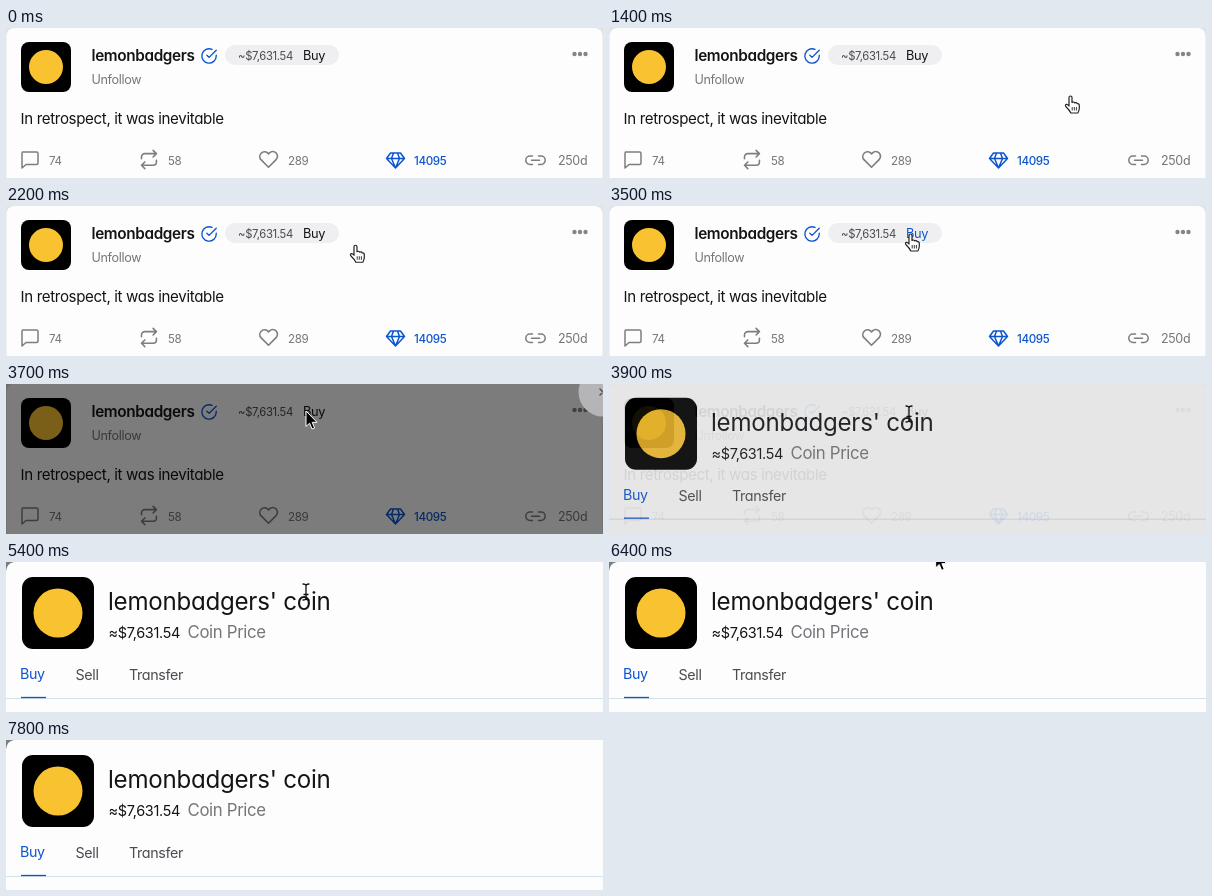
Animation, 597 px wide and 150 px high, one loop 8000 ms. Source, as an HTML page:

```html
<!DOCTYPE html>
<html lang="en">
<head>
<meta charset="utf-8">
<title>Coin purchase</title>
<style>
  html, body { margin: 0; width: 100%; height: 100%; overflow: hidden; background: #fdfdfe; }
  svg { display: block; font: 11.6px Inter, sans-serif; letter-spacing: -.03em; font-feature-settings: "cv11"; }
  .line { fill: none; stroke: #7d7d82; stroke-width: 1.5; stroke-linecap: round; stroke-linejoin: round; }
  .blue { stroke: #0d55cf; }
  .feather { stroke-width: 1.9; }
  .grey { fill: #75757a; }
  .tab { font-size: 14.3px; fill: #4b4b50; }
  .cursor { stroke-linejoin: round; }
</style>
</head>
<body>
<svg width="597" height="150" viewBox="0 0 597 150" fill="#141416">
  <g id="post">
    <rect width="597" height="150" fill="#e3e3e5"/>
    <rect x=".5" width="596" height="170" rx="8" fill="#fdfdfe"/>
    <rect x="15" y="14" width="50" height="50" rx="8" fill="#000"/>
    <circle cx="40" cy="39" r="17" fill="#f9c231"/>
    <text x="85.5" y="32.5" font-size="15.3" font-weight="600">lemonbadgers</text>
    <path class="line blue feather" transform="translate(194.4 19.3) scale(.72)"
      d="M22 11.1V12a10 10 0 1 1-5.9-9.1M22 4 12 14l-3-3"/>
    <rect id="pill" x="219" y="17" width="114" height="20" rx="10" fill="#efeff1"/>
    <text x="232" y="32" font-size="11.3" fill="#4b4b50">~$7,631.54</text>
    <text id="buy" x="297" y="32" font-size="12.8">Buy</text>
    <g fill="#858589">
      <circle cx="568.5" cy="26" r="2.2"/><circle cx="574" cy="26" r="2.2"/><circle cx="579.5" cy="26" r="2.2"/>
    </g>
    <text class="grey" x="85.5" y="56" font-size="12.6">Unfollow</text>
    <text x="14.5" y="96" font-size="15.1">In retrospect, it was inevitable</text>

    <g class="line">
      <path d="M16.5 124h14q1.5 0 1.5 1.5v9.5q0 1.5-1.5 1.5H20l-4 3.5v-14.5q0-1.5 1-1.5z"/>
      <path class="feather" transform="translate(133 121.5) scale(.83)"
        d="M17 1l4 4-4 4M3 11V9a4 4 0 0 1 4-4h14M7 23l-4-4 4-4M21 13v2a4 4 0 0 1-4 4H3"/>
      <path class="feather" transform="translate(252.2 121) scale(.86)"
        d="M20.8 4.6a5.5 5.5 0 0 0-7.7 0L12 5.7l-1.1-1.1a5.5 5.5 0 0 0-7.7 7.8L12 21.2l8.8-8.8a5.5 5.5 0 0 0 0-7.8z"/>
      <path class="blue" d="M384.500 125h10l4 5.500-9 9.500-9-9.500zM380.500 130.500h18M387.500 125l-2 5.500 4 9.500 4-9.500-2-5.500"/>
      <path d="M526.5 128h-2.5a4.2 4.2 0 0 0 0 8.4h2.5M532.5 128h2.5a4.2 4.2 0 0 1 0 8.4h-2.5M525.5 132.2h8"/>
    </g>
    <g class="grey">
      <text x="43" y="137">74</text>
      <text x="162" y="137">58</text>
      <text x="282" y="137">289</text>
      <text x="552" y="137" font-size="12.5">250d</text>
    </g>
    <text x="408" y="137" fill="#0d55cf" font-weight="500">14095</text>
  </g>

  <rect id="shade" width="597" height="150" fill="#000"/>
  <g id="close">
    <circle cx="597" cy="8" r="24.5" fill="#b5b4b6"/>
    <path class="line" style="stroke:#555" d="M594 5l6 6m0-6l-6 6"/>
  </g>

  <g id="modal">
    <rect y="-6" width="610" height="170" fill="#fdfdfe"/>
    <path id="corner" d="M0 0H8Q1 1 0 9z" fill="#7d7c7e"/>
    <rect x="16" y="15" width="72" height="72" rx="11" fill="#000"/>
    <circle cx="52" cy="51" r="24.5" fill="#f9c231"/>
    <text x="102" y="48" font-size="24.1" letter-spacing="-.01em">lemonbadgers' coin</text>
    <text x="102.5" y="76" font-size="14.5">≈$7,631.54</text>
    <text class="grey" x="181.5" y="76" font-size="16.8">Coin Price</text>
    <text class="tab" x="14" y="117" style="fill:#0d55cf">Buy</text>
    <text class="tab" x="69.5" y="118">Sell</text>
    <text class="tab" x="123" y="118">Transfer</text>
    <path d="M0 136.5H597" stroke="#d3e2e9"/>
    <path d="M15 135.5H40" stroke="#0d55cf" stroke-width="1.3"/>
  </g>

  <g id="pointer" class="cursor">
    <g id="hand" stroke="#222" stroke-width="1.2" fill="#fff">
      <path d="M0 11V2.5Q0 1 1.5 1T3 2.5V7.5Q5 6.3 5.7 8 7.5 7 8.3 8.7 10.2 8.3 10.3 10.5V13.5Q10 16 8.8 18H1.8Q.5 15-2.8 12-4.2 10.2-3 9.4-1.6 9 0 11z"/>
      <path d="M3.2 12v3.5M5.3 12v3.5M7.4 12v3.5" stroke-width=".9"/>
    </g>
    <path id="arrow" d="M0 0V15.5L3.6 12.2 6 18 8.6 17 6.2 11.3H11z" fill="#000" stroke="#fff"/>
    <path id="beam" d="M-3-5Q0-5 0-3Q0-5 3-5M0-3V9M-3 11Q0 11 0 9Q0 11 3 11M-2 5.5H2"
      fill="none" stroke="#111" stroke-width="1.3" stroke-linecap="round"/>
  </g>
</svg>
<script>
  const LOOP = 8000, STEP = 100;
  const part = id => document.getElementById(id);
  const show = (id, on) => part(id).style.display = on ? '' : 'none';
  const ramp = (t, a, b) => Math.min(1, Math.max(0, (t - a) / (b - a)));

  // Pointer path: time, x, y
  const path = [
    [1000, 579, 112], [1400, 460, 67], [1800, 430, 56], [2100, 364, 42],
    [2500, 300, 27], [5600, 300, 27], [5900, 305, 22], [6200, 318, 7], [6500, 331, -18]
  ];

  function pointAt(t) {
    const i = Math.max(1, path.findIndex(p => p[0] >= t));
    const [a, b] = [path[i - 1], path[i]];
    const k = ramp(t, a[0], b[0]);
    return [1, 2].map(j => a[j] + (b[j] - a[j]) * k);
  }

  function draw(t) {
    const hover = t >= 2400 && t < 3600;
    part('buy').style.fill = hover ? '#0d55cf' : '';
    show('pill', t < 3700);
    part('shade').style.opacity = ramp(t, 3500, 3700) * .51;
    show('close', t >= 3700 && t < 3800);

    const hidden = 1 - ramp(t, 3800, 4100);
    part('modal').style.opacity = t < 3800 ? 0 : 1 - .26 * hidden;
    part('modal').setAttribute('transform', `translate(0 ${-2 * hidden})`);
    show('corner', t >= 4000);

    const visible = t >= 1000 && t < 6500;
    show('pointer', visible);
    if (!visible) return;
    const [x, y] = pointAt(t);
    part('pointer').setAttribute('transform', `translate(${x} ${y})`);
    const kind = t < 3600 ? 'hand' : t < 3800 || y < 18 ? 'arrow' : 'beam';
    for (const id of ['hand', 'arrow', 'beam']) show(id, id === kind);
  }

  function tick() {
    const t = performance.now() % LOOP;
    draw(Math.floor(t / STEP) * STEP);
    requestAnimationFrame(tick);
  }
  tick();
</script>
</body>
</html>
```
